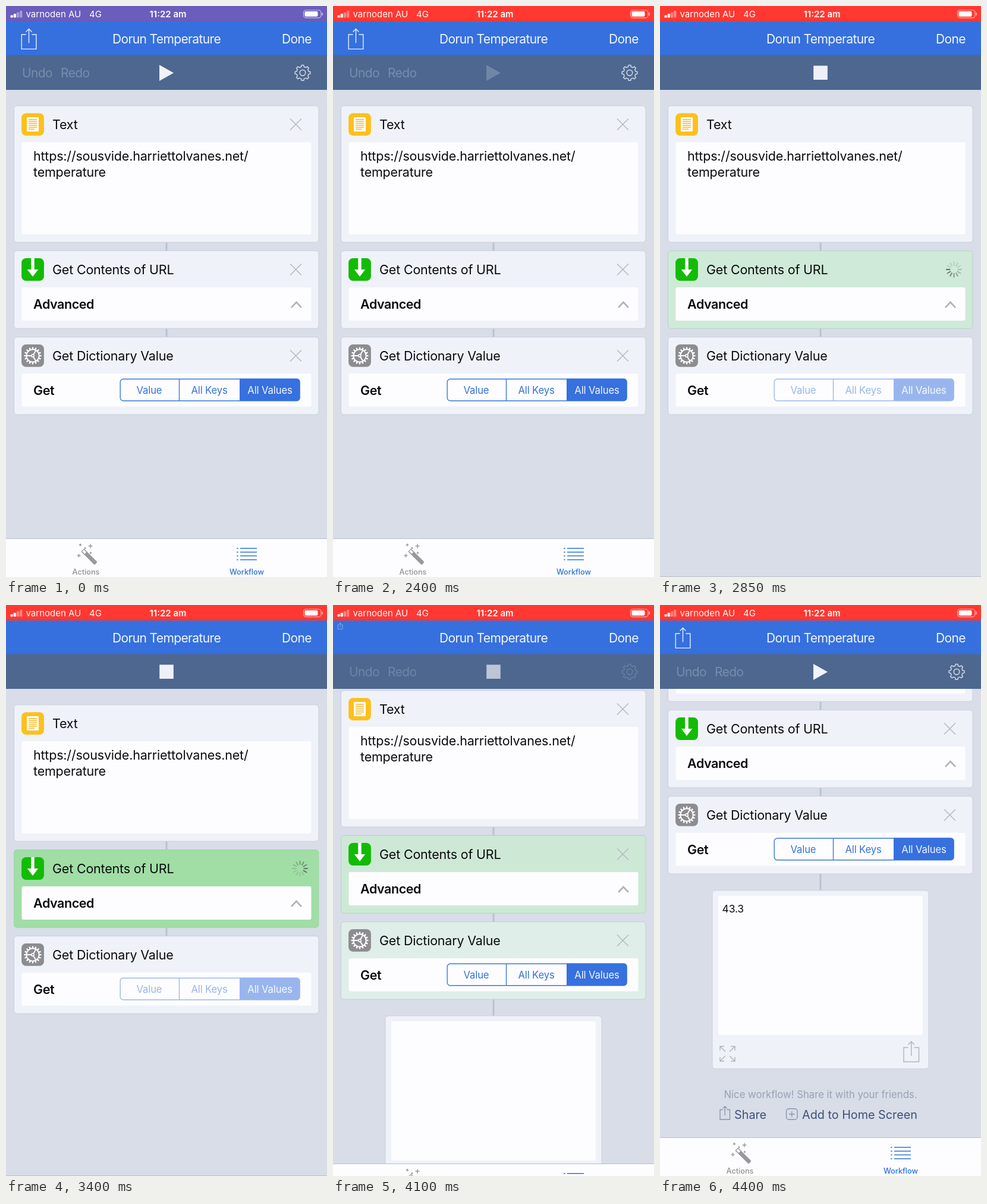
An HTML page that plays this animation: 540 px wide and 960 px high, repeating every 7900 ms.

```html
<!DOCTYPE html>
<html lang="en">
<head>
<meta charset="utf-8">
<title>Workflow run</title>
<style>
  html, body { margin: 0; width: 100%; height: 100%; overflow: hidden; background: #d8dde8; }
  svg { display: block; width: 100%; height: 100%; }
  text { font-family: Inter, "Open Sans", sans-serif; font-size: 21.5px; letter-spacing: -.009em; fill: #0b0b0d; }
  .nav { font-size: 21px; letter-spacing: -.03em; fill: #f4f6fb; }
  .status { font-size: 15px; letter-spacing: 0; fill: #fff; }
  .bold { font-weight: 600; letter-spacing: -.02em; }
  .seg { font-size: 16.7px; fill: #3672d6; text-anchor: middle; }
  .tab { font-size: 12.7px; font-weight: 500; letter-spacing: 0; text-anchor: middle; }
  .note { font-size: 16.7px; letter-spacing: 0; fill: #98a2b3; text-anchor: middle; }
  .link { font-size: 19.8px; letter-spacing: 0; fill: #3d5078; }
  .mid { text-anchor: middle; }
  .line { fill: none; stroke-width: 1.6; }
</style>
</head>
<body>
<svg id="stage" viewBox="0 0 540 960"></svg>
<script>
const LOOP = 7900, SCROLL = 235;
const stage = document.getElementById('stage');

const rect = (x, y, w, h, r, fill, extra = '') =>
  `<rect x="${x}" y="${y}" width="${w}" height="${h}" rx="${r}" fill="${fill}" ${extra}/>`;
const text = (x, y, s, cls = '', extra = '') =>
  `<text x="${x}" y="${y}" class="${cls}" ${extra}>${s}</text>`;
const line = (d, color, w = 1.6, extra = '') =>
  `<path class="line" d="${d}" stroke="${color}" style="stroke-width:${w}" ${extra}/>`;
const group = (id, body) => `<g id="${id}">${body}</g>`;
const times = (n, f) => Array.from({ length: n }, (_, i) => f(i)).join('');

// Arrow leaving an open box; x, y is the box's top left corner
function shareIcon(x, y, w, h, rise, color, lw) {
  const c = x + w / 2, a = w * .2, top = y - rise;
  return line(`M${c - w * .2} ${y}H${x}V${y + h}H${x + w}V${y}H${c + w * .2}
    M${c} ${y + h * .58}V${top}M${c - a} ${top + a}L${c} ${top}L${c + a} ${top + a}`, color, lw);
}

function gearPath(cx, cy, r, R, teeth) {
  const pts = [];
  for (let i = 0; i < teeth; i++) {
    [[-.3, r], [-.18, R], [.18, R], [.3, r]].forEach(([o, rad]) => {
      const a = (i + o) / teeth * 2 * Math.PI;
      pts.push((cx + rad * Math.sin(a)).toFixed(2) + ' ' + (cy - rad * Math.cos(a)).toFixed(2));
    });
  }
  return 'M' + pts.join('L') + 'Z';
}

const cross = (i, y) => group('cross' + i,
  line(`M478 ${y - 9.5}l19 19m0 -19l-19 19`, '#b6b8be', 1.5));

const card = (id, x, y, w, h) =>
  rect(x, y, w, h, 5, '#eff2f9', `id="${id}" stroke="#c9d0db" stroke-width="1"`);
const panel = (x, y, w, h) => rect(x, y, w, h, 3, '#fdfdff');
const link = (y, h) => rect(268.6, y, 2.8, h, 0, '#b5c3cf');
const badge = (y, fill) => rect(26.1, y, 37.8, 37.8, 7.5, fill);

const noteIcon = badge(180.2, '#fdc01b') + rect(35, 187, 20, 24, 1, '#fff') +
  times(6, i => line(`M38 ${191 + i * 3.2}h${i === 5 ? 10 : 14}`, '#f3b21c', 1.4));

const downIcon = badge(424.1, '#13bb04') +
  '<path d="M42.300 424h5.400v19h6.500l-9.200 12l-9.200 -12h6.500z" fill="#fff"/>';

const cogIcon = badge(569, '#8d8c91') +
  `<path d="${gearPath(45, 588, 11.5, 14.6, 16)}" fill="#fff"/>
   <circle cx="45" cy="588" r="9.700" fill="#8d8c91"/>` +
  line('M45 588L50 579.500M45 588L50 596.500M45 588H35', '#fff', 1.9) +
  '<circle cx="45" cy="588" r="2.900" fill="#fff"/><circle cx="45" cy="588" r="1.300" fill="#8d8c91"/>';

const segments = group('segments',
  rect(192.2, 627.2, 301.8, 36.6, 5, '#fdfdff', 'stroke="#3b78d6" stroke-width="1.4"') +
  line('M291.500 627V664', '#3b78d6', 1.4) +
  '<path d="M393 626.500h96.500a5 5 0 0 1 5 5v27.500a5 5 0 0 1 -5 5h-96.500z" fill="#3770df"/>' +
  text(241, 651.5, 'Value', 'seg') + text(342, 651.5, 'All Keys', 'seg') +
  text(444, 651.5, 'All Values', 'seg', 'style="fill:#f3f6fd"'));

const spinner = group('spinner', times(12, i =>
  `<path class="spoke" d="M494.500 436v-5.500" stroke="#5f6a64" stroke-width="2"
    stroke-linecap="round" transform="rotate(${i * 30} 494.5 443)"/>`));

const expandIcon = line(`M110 986L101 977m0 7v-7h7M117 986L126 977m-7 0h7v7
  M110 993L101 1002m0 -7v7h7M117 993L126 1002m-7 0h7v-7`, '#b3b6bd', 1.5);

const result = group('result',
  link(687, 28) + card('cardOut', 88, 714.8, 364, 300) + panel(98, 724, 344, 234) +
  text(104.5, 752, '43.3', '', 'id="reading" style="font-size:17.5px"') +
  expandIcon + shareIcon(410, 979, 25.5, 24, 10, '#b3b6bd', 1.5) +
  text(270, 1064, 'Nice workflow! Share it with your friends.', 'note') +
  shareIcon(101, 1083.5, 16.5, 16.5, 5.500, '#8793aa', 1.3) + text(125, 1099, 'Share', 'link') +
  rect(212.5, 1082, 18.5, 18, 4, 'none', 'stroke="#8793aa" stroke-width="1.3"') +
  line('M217 1091h9.500m-4.750 -4.750v9.500', '#8793aa', 1.3) +
  text(239, 1099, 'Add to Home Screen', 'link'));

const list = group('list',
  link(397, 15) + link(542, 15) +
  card('card0', 13.5, 167.8, 512.5, 229.4) + noteIcon + text(78, 207, 'Text') + cross(0, 199) +
  panel(26.5, 229, 487, 155) +
  text(46, 260, 'https://sousvide.harriettolvanes.net/') + text(46, 286.5, 'temperature') +
  card('card1', 13.5, 411.6, 512.5, 130.6) + downIcon + text(78, 451, 'Get Contents of URL') +
  cross(1, 443) + spinner + panel(26.5, 473, 487, 56) + text(46, 509, 'Advanced', 'bold') +
  line('M480 507L488.500 498L497 507', '#b2b3b8', 2.6) +
  card('card2', 13.5, 556.6, 512.5, 130.4) + cogIcon + text(78, 596, 'Get Dictionary Value') +
  cross(2, 588) + panel(26.5, 618, 487, 55.5) + text(46, 653.5, 'Get', 'bold') + segments + result);

const sparkle = (x, y, r) => line(`M${x - r} ${y}h${2 * r}m${-r} ${-r}v${2 * r}`, '#9b9ba0', 1.5);
const tabs = group('tabs',
  rect(0, 896, 540, 66, 0, '#fdfdff') + rect(0, 895, 540, 1, 0, '#b9bec8') +
  sparkle(125, 906, 2.2) + sparkle(142, 908, 3.5) + sparkle(133, 911.5, 1.6) +
  sparkle(122.5, 924, 3) + sparkle(142.5, 919.5, 1.8) +
  '<g transform="rotate(45 140 926)">' +
  rect(124, 922.6, 32, 6.8, 1.5, '#98989d') + rect(125.2, 924, 6, 4, .5, '#fdfdff') + '</g>' +
  text(134.5, 955.5, 'Actions', 'tab', 'style="fill:#919196"') +
  times(4, i => line(`M388 ${911.8 + i * 6.4}h2.600m3.400 0h28`, '#2b74dd', 1.5)) +
  text(405, 955.5, 'Workflow', 'tab', 'style="fill:#2b70de"'));

const toolbar = rect(0, 82, 540, 59, 0, '#4d678f') +
  group('undo', text(27, 120, 'Undo', 'nav') + text(92, 120, 'Redo', 'nav')) +
  group('gear',
    line(gearPath(499, 112.3, 10.3, 13, 8), '#d3dae6', 1.5, 'stroke-linejoin="round"') +
    '<circle class="line" cx="499" cy="112.300" r="4.800" stroke="#d3dae6"/>') +
  '<path id="play" d="M258 99L282 112.500L258 126z" fill="#f0f3f8"/>' +
  rect(258.2, 100.4, 23.6, 23.6, 0, '#eef0f7', 'id="stop"');

const navbar = rect(0, 26, 540, 56.5, 0, '#3670de') +
  text(270, 63, 'Dorun Temperature', 'nav mid') + text(464, 63, 'Done', 'nav') +
  group('share', shareIcon(26.2, 48, 24.6, 24.4, 9.5, '#e8eefb', 1.4));

const status = rect(0, 0, 540, 26, 0, '#ff3831', 'id="status"') +
  times(4, i => rect(7.5 + i * 5.2, 15.5 - i * 2.5, 4.2, 4 + i * 2.5, 1, '#fff', `opacity="${i < 2 ? 1 : .4}"`)) +
  text(33.5, 19, 'varnoden AU', 'status') + text(140, 19, '4G', 'status') +
  text(272.5, 19, '11:22 am', 'status mid', 'style="font-weight:600"') +
  rect(500.5, 7, 29.5, 12.800, 4, 'none', 'stroke="#fff" stroke-opacity=".6" stroke-width="1.2"') +
  rect(502.5, 9, 22, 8.8, 2, '#fff') + rect(531.3, 11, 1.7, 5, .8, '#fff', 'opacity=".6"');

stage.innerHTML = rect(0, 0, 540, 960, 0, '#d8dde8') + list + toolbar + navbar + status + tabs;

const el = id => document.getElementById(id);
const set = (id, name, value) => el(id).setAttribute(name, value);
const fade = (id, value) => set(id, 'opacity', value);
const spokes = [...document.querySelectorAll('.spoke')];
const ramp = (t, a, b) => Math.min(1, Math.max(0, (t - a) / (b - a)));
const ease = x => (1 - Math.cos(Math.PI * x)) / 2;
const mix = (a, b, k) => `rgb(${a.map((v, i) => Math.round(v + (b[i] - v) * k))})`;

const PLAIN = [239, 242, 249], GREEN = [160, 222, 166];
const EDGE = [201, 208, 219], GREEN_EDGE = [154, 214, 161];

function tint(id, k) {
  set(id, 'fill', mix(PLAIN, GREEN, k));
  set(id, 'stroke', mix(EDGE, GREEN_EDGE, k));
}

function draw(ms) {
  const t = Math.floor(ms / 50) * 50;
  const done = t >= 4050;
  const hide = ease(ramp(t, 2500, 2750));
  const shown = 1 - hide + ease(ramp(t, 4005, 4255));
  const tools = 1 - hide + ease(ramp(t, 4025, 4275));

  set('status', 'fill', mix([106, 93, 188], [255, 56, 49], ramp(t, 0, 300)));
  set('list', 'transform', `translate(0 ${-Math.round(SCROLL * ease(ramp(t, 4021, 4400)))})`);
  set('tabs', 'transform', `translate(0 ${Math.round(64 * (1 - shown))})`);
  set('share', 'transform', `translate(0 26) scale(${shown}) translate(0 -26)`);
  fade('undo', Math.min(.26, tools));
  fade('gear', tools);
  fade('play', tools * (t >= 2400 && t < 4150 ? .22 : 1));
  fade('stop', 1 - shown);

  const crosses = done ? 1 : 1 - ramp(t, 2500, 2700);
  for (let i = 0; i < 3; i++) fade('cross' + i, crosses);
  fade('segments', t >= 2500 && t < 4000 ? .5 : 1);

  tint('card1', ramp(t, 2650, 3150) * (1 - ramp(t, 3950, 4215)));
  tint('card2', .2 * ramp(t, 4000, 4100) * (1 - ramp(t, 4100, 4300)));

  fade('spinner', done ? 0 : ramp(t, 2650, 2800));
  const lead = Math.floor((t - 2850) * 12 / 1000 + 9.4);
  spokes.forEach((s, i) => {
    const age = ((lead - i) % 12 + 12) % 12;
    s.setAttribute('opacity', Math.max(.22, 1 - age * .11));
  });

  fade('result', done ? 1 : 0);
  fade('reading', t >= 4150 ? 1 : 0);
}

const start = performance.now();
(function tick() {
  draw((performance.now() - start) % LOOP);
  requestAnimationFrame(tick);
})();
</script>
</body>
</html>
```
